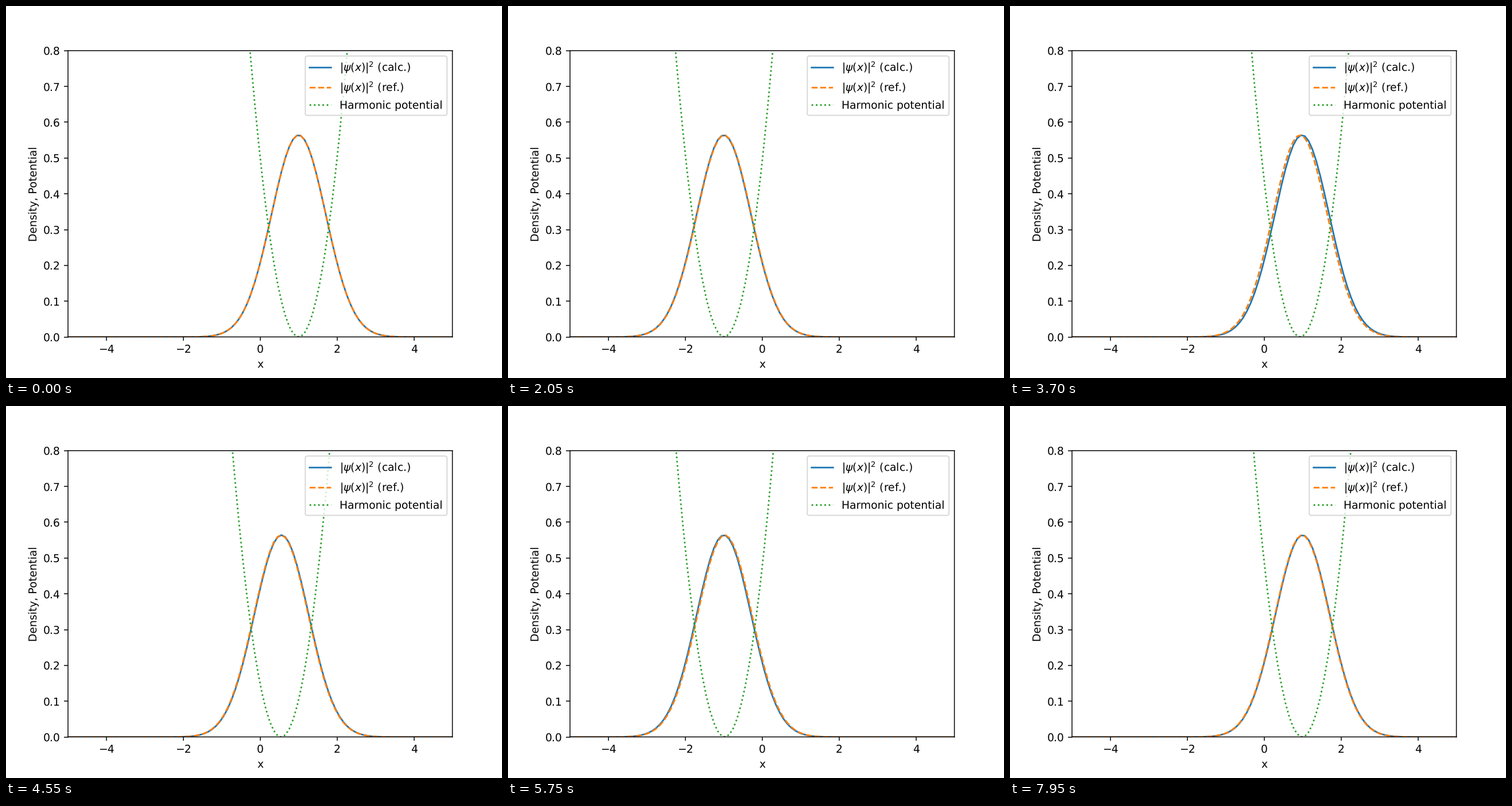
These frames come from a looping animation (864x648 px, 8 s). A matplotlib script:

```python
import numpy as np
import matplotlib.pyplot as plt
from matplotlib.animation import FuncAnimation

# Unhinted text and unsnapped lines keep exact sub-pixel positions.
plt.rcParams["text.hinting"] = "no_hinting"
plt.rcParams["path.snap"] = False

FRAMES = 160
INTERVAL = 50      # ms
DT = 0.4           # simulated time per frame
DRIVE = 0.2        # angular frequency of the moving trap

x = np.linspace(-10, 10, 200)


def trap_center(t):
    return np.cos(DRIVE * t)


def packet_center(t):
    """Solution of X'' = -(X - cos(DRIVE t)) with X(0) = 1, X'(0) = 0."""
    w2 = DRIVE ** 2
    return (np.cos(DRIVE * t) - w2 * np.cos(t)) / (1 - w2)


def density(center):
    return np.exp(-(x - center) ** 2) / np.sqrt(np.pi)


def potential(center):
    return 0.5 * (x - center) ** 2


fig, ax = plt.subplots(figsize=(6.4, 4.8), dpi=135)
ax.spines["bottom"].set_position(("outward", -0.15))
calc, = ax.plot(x, density(1), label=r"$|\psi(x)|^2$ (calc.)")
ref, = ax.plot(x, density(1), "--", label=r"$|\psi(x)|^2$ (ref.)")
trap, = ax.plot(x, potential(1), ":", label="Harmonic potential")
ax.set_xlim(-5, 5)
ax.set_ylim(0, 0.8)
ax.set_xlabel("x")
ax.set_ylabel("Density, Potential")
ax.legend(loc="upper right")


def update(frame):
    t = DT * frame
    calc.set_ydata(density(packet_center(t)))
    ref.set_ydata(density(trap_center(t)))
    trap.set_ydata(potential(trap_center(t)))
    return calc, ref, trap


anim = FuncAnimation(fig, update, frames=FRAMES, interval=INTERVAL,
                     init_func=lambda: update(0), repeat=True,
                     repeat_delay=0, blit=False)
plt.show()
```
